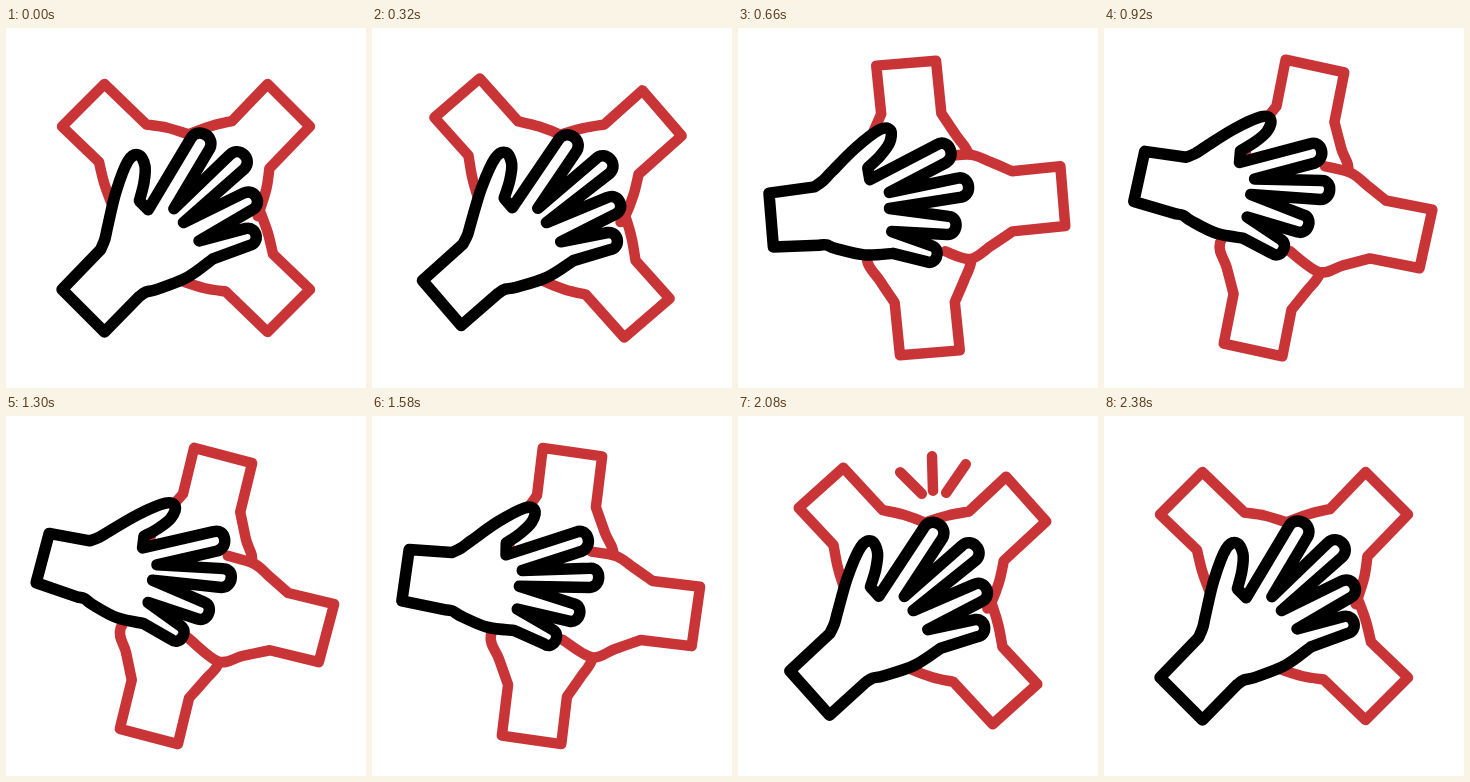
Animation of 360 by 360 pixels, one loop 2.4 s. Source, as an HTML page:

```html
<!DOCTYPE html>
<html lang="en">
<head>
<meta charset="utf-8">
<title>Hands together</title>
<style>
  html, body { margin: 0; width: 100%; height: 100%; overflow: hidden; background: #fff; }
  svg { display: block; width: 100vw; height: 100vh; }
  path { stroke-linecap: round; stroke-linejoin: round; fill: #fff; }
  .red { stroke: #c93537; stroke-width: 10.5; }
  .black { stroke: #000; stroke-width: 11.5; }
</style>
</head>
<body>
<svg viewBox="-180 -180 360 360">
  <path class="red" id="top"/>
  <path class="red" id="bottom"/>
  <path class="red" id="right"/>
  <path class="black" id="hand"/>
  <path class="red" id="rays"/>
</svg>
<script>
// Shapes are drawn with the forearm along -x and the origin at the stage centre.
const LOOP = 2400, TURN = 60, REST = -45;
const CUFF = { x: -145.3, y: 30 };
const HEEL = [[-96, 29.5], [-88, 31], [-78, 37], [-48, 50], [-17, 55]];
const TIPS = [[23, 64], [48.4, 39.2], [68.6, 3.5], [55.2, -35.4]];
const VALLEYS = [[-14, 32.5], [-12, 8.5], [-9, -8], [-28, -25.5]];
const THUMB = [[-28, -38], [-12, -47.5], [0.7, -58.7], [4, -71], [-7.8, -74.2],
  [-38, -61], [-68, -42.6], [-80, -35], [-90, -31]];

const $ = id => document.getElementById(id);
const clamp = x => Math.max(0, Math.min(1, x));
const mix = (a, b, k) => a + (b - a) * k;
const mixPt = (a, b, k) => [mix(a[0], b[0], k), mix(a[1], b[1], k)];
const fmt = pts => pts.map(q => q.map(v => v.toFixed(2)).join(" ")).join(" ");
const line = (...pts) => "L" + fmt(pts);

// Smooth curve through the points, starting at the first one
function spline(pts) {
  const at = i => pts[Math.max(0, Math.min(pts.length - 1, i))];
  const ctrl = (p, a, b) => [p[0] + (b[0] - a[0]) / 6, p[1] + (b[1] - a[1]) / 6];
  let d = line(pts[0]);
  for (let i = 0; i < pts.length - 1; i++) {
    d += "C" + fmt([ctrl(at(i), at(i - 1), at(i + 1)), ctrl(at(i + 1), at(i + 2), at(i)), at(i + 1)]);
  }
  return d;
}

// The palm pulls back, tilts and shrinks as the group turns.
function pull([x, y], p) {
  return mixPt([x, y], [0.84 * x + 0.13 * y - 27.5, -0.19 * x + 0.93 * y - 17], p);
}

// Rounded fingertip: slimmer and more splayed towards the little finger
function finger([x, y], i, move) {
  const a = (35 - 18 * i) * Math.PI / 180, r = 8.7 + 0.7 * i;
  const u = [Math.cos(a) * r, Math.sin(a) * r];
  const pt = (along, side) => move([x + u[0] * along - u[1] * side, y + u[1] * along + u[0] * side]);
  return line(pt(0, 1)) + "C" + fmt([pt(4 / 3, 1), pt(4 / 3, -1), pt(0, -1)]);
}

function handPath(p) {
  const move = q => pull(q, p);
  const x = CUFF.x - 3 * p, y = CUFF.y * (1 - 0.15 * p);
  const fingers = TIPS.map((tip, i) => finger(tip, i, move) + line(move(VALLEYS[i])));
  return "M" + fmt([[x, y]]) + spline(HEEL.map(move)) + fingers.join("") +
    spline(THUMB.map(move)) + line([x, -y]) + "Z";
}

function armPath(p) {
  const lower = [mixPt([-55, 49.5], [-30, 49.5], p), [-58, 48.5], [-76, 40], [-94 - 4 * p, 29]];
  const upper = [[-87 - 8 * p, -31], [-70, -43.5], [-48, -55], mixPt([-45, -56.5], [-13, -40], p)];
  return "M" + fmt([lower[0]]) + spline(lower) +
    line([CUFF.x, CUFF.y], [CUFF.x, -CUFF.y]) + spline(upper);
}

// Symmetric cubic-bezier(.7, 0, .3, 1)
function ease(x) {
  if (x <= 0 || x >= 1) return clamp(x);
  let lo = 0, hi = 1, s = 0.5;
  for (let i = 0; i < 24; i++) {
    s = (lo + hi) / 2;
    const v = 2.1 * s * (1 - s) ** 2 + 0.9 * s * s * (1 - s) + s ** 3;
    if (v < x) lo = s; else hi = s;
  }
  return s * s * (3 - 2 * s);
}

// Three strokes shoot outwards, then vanish from the inner end.
function raysPath(t) {
  const out = x => 1 - (1 - clamp(x)) ** 2;
  const head = out((t - 1900) / 200), tail = out((t - 2080) / 220);
  if (head <= tail) return "";
  const rays = [[4, -102, -18, -124], [15, -105, 14, -140], [28, -103, 48, -132]];
  return rays.map(([x0, y0, x1, y1]) => {
    const at = k => mixPt([x0, y0], [x1, y1], k);
    return "M" + fmt([at(tail)]) + line(at(head));
  }).join("");
}

function show(id, d, angle) {
  $(id).setAttribute("d", d);
  $(id).setAttribute("transform", `rotate(${angle})`);
}

function draw(t) {
  const p = t < 1200 ? ease((t - 16) / 1160) : 1 - ease((t - 1228) / 1113);
  const angle = REST + TURN * p, arm = armPath(p);
  show("hand", handPath(p), angle);
  ["top", "right", "bottom"].forEach((id, i) => show(id, arm, angle + 90 * (i + 1)));
  show("rays", raysPath(t), 0);
}

const start = performance.now();
function tick() {
  draw((performance.now() - start) % LOOP);
  requestAnimationFrame(tick);
}
tick();
</script>
</body>
</html>
```
